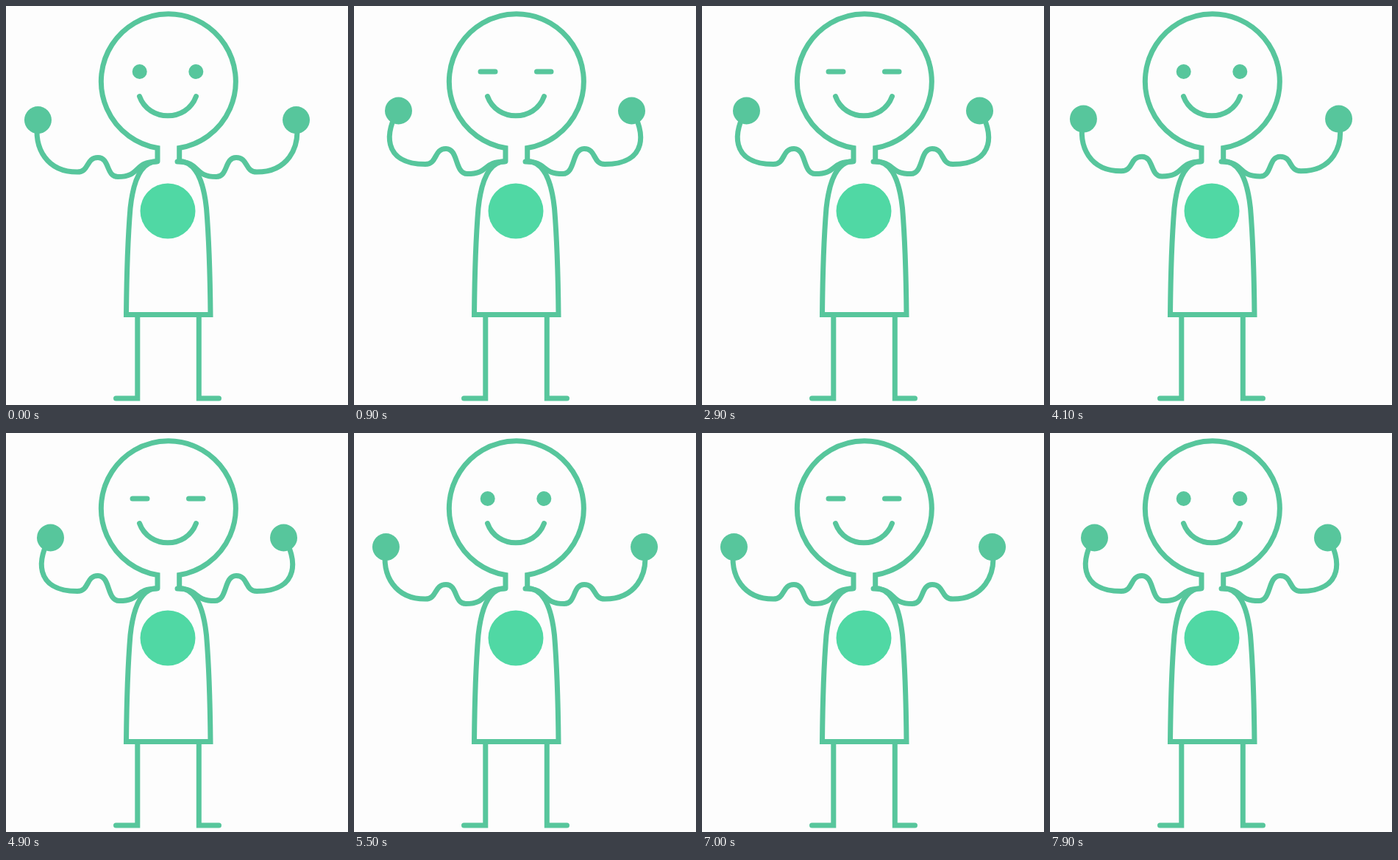
These frames come from a looping animation (465x541 px, 8 s). An HTML page:

```html
<!DOCTYPE html>
<html lang="en">
<head>
<meta charset="utf-8">
<title>Waving figure</title>
<style>
  html, body { margin: 0; width: 100%; height: 100%; overflow: hidden; background: #fdfdfd; }
  svg { display: block; width: 465px; height: 541px; }
  .line { fill: none; stroke: #57c69c; stroke-width: 7; }
  .round { stroke-linecap: round; }
  .fill { fill: #57c69c; }
</style>
</head>
<body>
<svg viewBox="0 0 465 541">
  <defs>
    <g id="arm">
      <path id="sleeve" class="line round"/>
      <circle id="hand" class="fill" r="18.5"/>
    </g>
    <path id="side" class="line" d="M206 210.5C184 210.5 173 237 169 274C165.5 316 164 368 163.5 418.5H222"/>
  </defs>

  <path class="line round" d="M206 210.5V192.500A91.500 91.500 0 1 1 235.700 192.500V210.500"/>
  <path class="line round" d="M181.500 122.500C194 157.500 246 157.500 258.500 122.500"/>
  <g id="open" class="fill">
    <circle cx="181.700" cy="89" r="10"/>
    <circle cx="258.300" cy="89" r="10"/>
  </g>
  <path id="closed" class="line round" d="M172 89H192M248.500 89H268"/>

  <use href="#side"/>
  <use href="#side" transform="translate(441.500 0) scale(-1 1)"/>
  <path class="line round" d="M149.500 532H178.800V420M289.500 532H262.300V420"/>
  <circle cx="220" cy="278" r="37.500" fill="#50d8a4"/>

  <use href="#arm"/>
  <use href="#arm" transform="translate(438 0) scale(-1 1)"/>
</svg>
<script>
  const LOOP = 8000, STEP = 100, SWING = 500, BLINK = 2000;

  const $ = id => document.getElementById(id);
  const show = (el, on) => el.setAttribute("visibility", on ? "visible" : "hidden");

  // S-curve between two points where the arm runs level
  function wave([x0, y0], [x1, y1]) {
    const reach = (x1 - x0) * 0.6;
    return `C${x0 + reach} ${y0} ${x1 - reach} ${y1} ${x1} ${y1}`;
  }

  function drawArm(lift) {
    const hand = [43.5 + 17 * lift, 154.5 - 12.5 * lift];
    const elbow = [97, 225 - 10.5 * lift];
    const hump = [125, 205.5 - 12 * lift];
    const dip = [152 + 2 * lift, 231.5 - 4 * lift];
    const shoulder = [205, 211];
    const wrist = [hand[0] - 7 - 11 * lift, hand[1] + 40 - 14 * lift];
    const bend = [elbow[0] - 40 - 20 * lift, elbow[1]];

    $("sleeve").setAttribute("d", `M${hand}C${wrist} ${bend} ${elbow}`
      + wave(elbow, hump) + wave(hump, dip) + wave(dip, shoulder));
    $("hand").setAttribute("cx", hand[0]);
    $("hand").setAttribute("cy", hand[1]);
  }

  function draw(time) {
    const t = Math.floor(time / STEP) * STEP;
    drawArm(1.96 * Math.abs(Math.sin(Math.PI * (t - 45) / SWING)) - 0.55);

    const phase = t % BLINK;
    const blink = phase >= 900 && phase < 1100;
    show($("open"), !blink);
    show($("closed"), blink);
  }

  const start = performance.now();
  function tick() {
    draw((performance.now() - start) % LOOP);
    requestAnimationFrame(tick);
  }
  tick();
</script>
</body>
</html>
```
